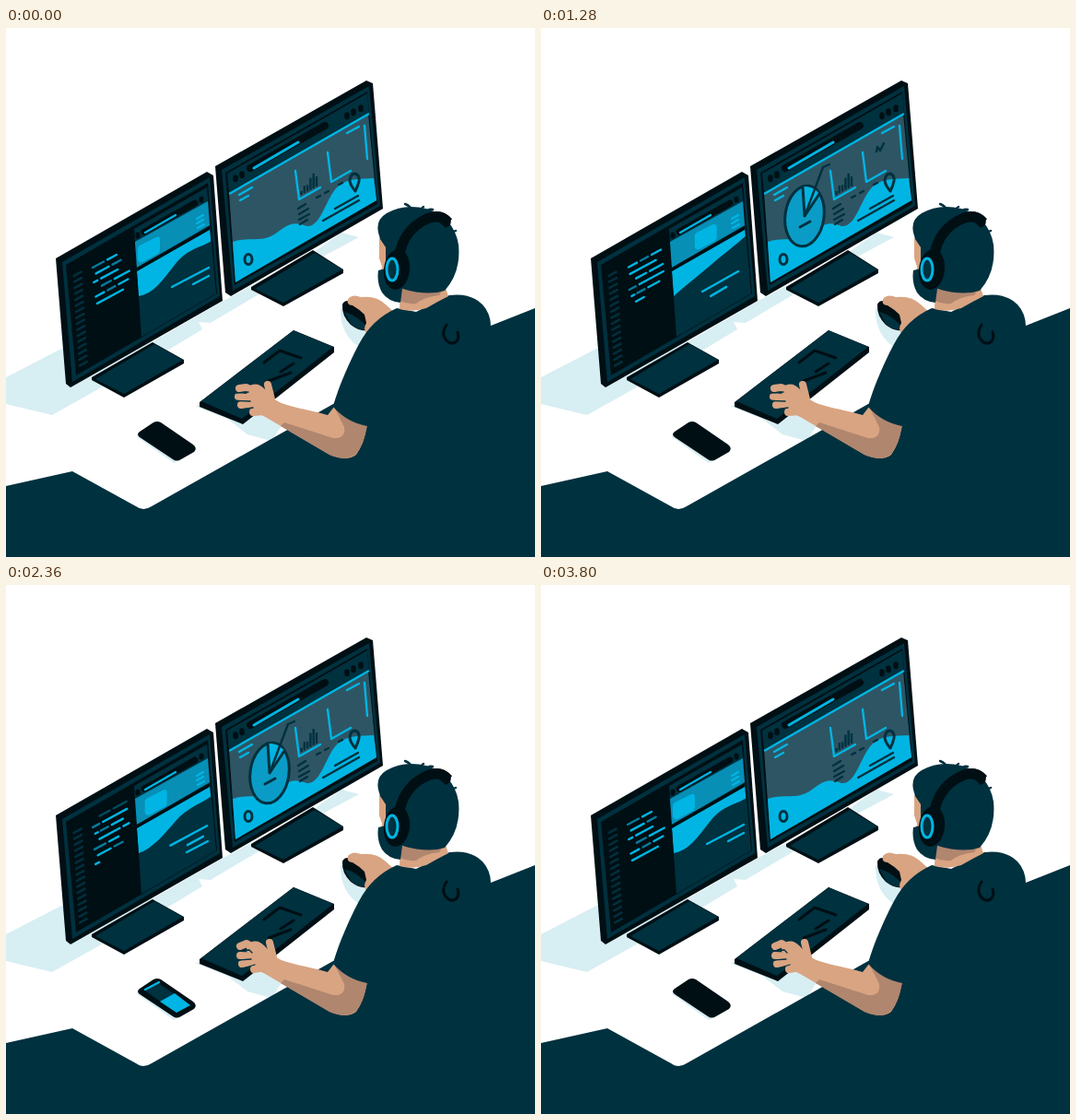
Write an HTML page that moves like this. It is 574 px wide and 574 px high and loops after 3.84 s.

```html
<!DOCTYPE html>
<html lang="en">
<head>
<meta charset="utf-8">
<title>Developer at a desk</title>
<style>
  html, body { margin: 0; height: 100%; overflow: hidden; background: #fff }
  svg { display: block; width: 100vw; height: 100vh }
  .n { fill: #00313f } .k { fill: #000f14 } .c { fill: #00b5e3 }
  .s { fill: #d9a482 } .d { fill: #b0866e } .w { fill: #d7eef3 }
  .l { fill: none; stroke: #00b5e3; stroke-width: 2.4; stroke-linecap: round; stroke-linejoin: round }
  .nl { stroke: #00313f } .kl { stroke: #000f14 } .sl { stroke: #d9a482; stroke-width: 8 }
</style>
</head>
<body>
<svg viewBox="0 0 574 574">
  <clipPath id="site"><path d="M142 264L221 219 229 288 147 335Z"/></clipPath>

  <!-- desk shadows and floor -->
  <path class="w" d="M0 379L60 348 160 340 236 296 330 246 364 222 383 227 340 250 222 320 209 319 213 327 180 347 50 420 0 408Z"/>
  <path class="w" d="M205 410L240 424 262 441 288 448 300 430 270 405ZM141 443L182 472 188 469 160 440Z"/>
  <path class="n" d="M0 497L72 481 141 519Q149 525 158 519L355 408 526 323 574 304V574H0Z"/>

  <!-- left monitor -->
  <path class="k" d="M93 379L159 341 193 360V364L128 401 93 382Z"/>
  <path class="n" d="M97 381L161 343 192 360 128 397Z"/>
  <path class="k" d="M54 250L218 156 225 160 235 296 70 390 65 386Z"/>
  <path class="n" d="M61 254L221 162 232 291 72 384Z"/>
  <path class="k" d="M65 257L219 168 229 288 76 377Z"/>
  <path class="n" d="M139 218L218 173 228 288 147 335Z"/>
  <path class="l kl" style="stroke-width:7" d="M150 221L205 190"/>
  <path class="l kl" style="stroke-width:5" d="M143 224v2M212 185v2"/>
  <path class="l" d="M151 222L184 203"/>
  <path fill="#078fb6" d="M140 232L219 188 221 214 142 260Z"/>
  <path class="l" d="M207 207l7-4M207 212l7-4M208 217l7-4"/>
  <path class="k" d="M142 260L221 215V219L142 264Z"/>
  <path id="gutter" class="l nl"/>
  <g id="left"></g>

  <!-- right monitor -->
  <path class="k" d="M266 281L333 241 366 262V266L301 302 266 284Z"/>
  <path class="n" d="M270 283L335 244 365 262 301 298Z"/>
  <path class="k" d="M227 150L391 57 398 60 409 196 244 291 238 287Z"/>
  <path class="n" d="M234 154L394 63 406 193 246 285Z"/>
  <path class="k" d="M238 157L392 69 403 191 248 279Z"/>
  <path class="n" d="M240 158L392 71 394 93 242 179Z"/>
  <path class="l kl" style="stroke-width:8" d="M265 152L346 106"/>
  <path class="l kl" style="stroke-width:5.5" d="M249 162v2.5M256 158v2.5M370 94v2.5M377 90v2.5M385 86v2.5"/>
  <path class="l" style="stroke-width:3" d="M269 152L317 124"/>
  <path fill="#2e5564" d="M242 179L393 93 402 187 249 276Z"/>
  <path class="c" d="M246 232C264 226 278 233 291 224S310 208 326 215C342 217 347 184 360 172 372 162 385 164 399 163L402 187 249 276Z"/>
  <path class="l" d="M243 179.5L393 93.5M389 106L392 142M370 114L383 107M253 181L267 173M254 187L263 182M314 155L318 186 341 173M349 135L353 167 374 155"/>
  <path class="l nl" d="M317 196l8-5M318 202l10-6M318 208l11-6M319 213l8-5M337 184l4-2M346 179l4-2M361 170l4-2M344 209L383 187M357 196L382 182"/>
  <path class="l nl" style="stroke-width:3" d="M379 177Q373 170 373 165 374 158 379 158 384 160 383 166 382 171 379 177Z"/>
  <ellipse class="l nl" style="stroke-width:3" cx="263" cy="251" rx="4" ry="5.5"/>
  <g id="right"></g>

  <!-- phone -->
  <path class="k" d="M145 438L160 428Q164 426 168 428L203 452Q208 456 204 460L190 468Q185 471 181 468L145 444Q141 441 145 438Z"/>
  <g id="phone">
    <path class="n" d="M149 439L164 431 200 456 185 464Z"/>
    <path class="c" d="M167 452L183 443 200 456 185 464Z"/>
    <path class="l" d="M151 439L166 431"/>
  </g>

  <!-- keyboard -->
  <path class="k" d="M210 406L312 328 356 346V352L257 430 210 411Z"/>
  <path class="n" d="M212 405L312 328 355 346 256 424Z"/>
  <path class="l kl" style="stroke-width:3" d="M280 363L297 350 320 358M298 373L312 364M285 383L309 374"/>

  <!-- mouse and right hand -->
  <path class="w" d="M363 304Q362 334 386 348L400 326 380 312Z"/>
  <g id="mouse">
    <path class="k" d="M365 300Q368 293 377 298L392 311Q398 320 394 327 386 331 374 322 364 312 365 300Z"/>
    <path class="n" d="M367 308Q382 312 393 326 385 330 374 321Z"/>
    <path class="s" d="M371 294Q376 288 385 292 402 290 412 300L424 311 404 335 391 331Q387 327 391 320L389 311Q383 305 376 301 369 301 371 294Z"/>
  </g>

  <!-- typing arm -->
  <path class="s" d="M261 390Q272 382 281 392L290 402C302 411 325 413 349 420L356 411 392 432Q388 452 380 463 370 471 351 463L283 423 262 412Z"/>
  <path class="d" d="M302 428L355 445Q369 446 367 433L356 411 392 432Q388 453 380 462 370 471 351 463L298 432Z"/>
  <path id="fingers" class="l sl"/>
  <path id="gaps" class="l" style="stroke:#00313f;stroke-width:1.3"/>

  <!-- person -->
  <g id="body">
    <path class="n" d="M355 411C361 388 375 358 383 343Q397 316 424 304L445 308 481 290Q504 287 517 300 527 311 526 327L574 350V574H330L385 465 392 432Q370 428 355 411Z"/>
    <path class="l kl" style="stroke-width:3" d="M478 322Q472 331 477 338 483 345 489 340 492 336 490 330"/>
  </g>
  <g id="head">
    <path class="s" d="M428 280L477 282 480 291Q468 297 456 304 440 309 427 305Z"/>
    <path class="d" d="M428 284L474 284 470 290Q453 292 445 299 436 300 427 296Z"/>
    <path class="s" d="M405 228L420 226 420 275 406 268 408 259 405 250Z"/>
    <path class="n" d="M404 222Q401 208 413 201 432 190 456 196 486 205 491 235 494 265 476 285 458 291 430 283L428 298Q415 297 408 287 402 276 404 263L412 261 412 238 406 229Z"/>
    <path class="l nl" d="M433 191Q439 193 441 199M453 194Q449 196 451 201M456 200Q458 196 463 197M480 219Q484 222 488 220"/>
    <path class="l kl" style="stroke-width:11;stroke-linecap:butt" d="M427 246Q431 222 451 210 469 199 480 211"/>
    <path class="k" d="M460 201Q474 196 482 206 485 214 477 217Z"/>
    <ellipse class="k" cx="424" cy="262" rx="14" ry="22" transform="rotate(7 424 262)"/>
    <ellipse class="l" style="fill:#00313f;stroke-width:3" cx="419" cy="262" rx="6" ry="12"/>
  </g>
</svg>
<script>
const LOOP = 3840, HALF = LOOP / 2, ROW_TIME = LOOP / 10;
const get = id => document.getElementById(id);
const ramp = (t, a, b) => {
  const p = Math.max(0, Math.min(1, (t - a) / (b - a)));
  return p * p * (3 - 2 * p);
};
const pulse = (t, a, b, c, d) => ramp(t, a, b) - ramp(t, c, d);
const mix = (a, b, p) => a.map((v, i) => v + (b[i] - v) * p);
const shift = (id, x, y) => get(id).setAttribute('transform', `translate(${x} ${y})`);
const stroke = (d, extra = '') => `<path class="l" d="${d}" ${extra}/>`;

get('gutter').setAttribute('d', Array.from({ length: 16 }, (_, i) =>
  `M${73.5 + i * .42} ${269 + i * 6.5}l8-4.4`).join(''));

// Each code row: pairs of start and length along the row.
const rows = [
  [8, 11, 23, 14], [0, 7, 11, 26], [2, 3, 8, 8, 20, 12], [6, 22, 32, 6], [0, 12, 16, 10],
  [3, 14, 21, 9], [0, 4, 8, 18], [8, 10, 22, 16], [1, 9, 14, 8, 26, 10], [2, 28]
];

function drawCode(t) {
  const pos = t / ROW_TIME, k = Math.floor(pos), part = pos - k;
  const scroll = ramp(part, 0, .25);
  let out = '';
  for (let i = 0; i < 7; i++) {
    const row = (k + i + 4) % 10, slot = i - scroll;
    const typed = i == 6 ? part * 44 : 44;
    for (let j = 0; j < rows[row].length; j += 2) {
      const start = rows[row][j], len = Math.min(rows[row][j + 1], typed - start);
      if (len <= 0) continue;
      const x = 94 + slot * .6 + start, y = 260 + slot * 8 - start * .54;
      const color = (row + j) % 3 == 1 ? '#087a9c' : '#00b5e3';
      out += stroke(`M${x} ${y}l${len} ${-len * .54}`,
        `style="stroke:${color}" opacity="${i ? 1 : 1 - scroll}"`);
    }
  }
  return out;
}

function drawSite(t, h) {
  const p = pulse(h, 320, 640, 1270, 1470);
  const w = mix([160, 288, 172, 272, 183, 257, 197, 239, 208, 240, 223, 231],
                [157, 279, 169, 270, 182, 259, 195, 248, 208, 238, 223, 225], p);
  const a = mix([180, 281, 220, 260], [175, 286, 214, 264], p);
  const b = mix([203, 278, 220, 269], [184, 291, 201, 281], p);
  const extra = pulse(t, 1500, 1800, 3000, 3300);
  return `<g clip-path="url(#site)"><path class="c" d="M142 264L222 218V${w[11]}L${w.slice(10)}
      C${w.slice(8, 10)} ${w.slice(6, 8)} ${w.slice(4, 6)}S${w.slice(0, 2)} 144 291Z"/></g>
    <path fill="#00b5e3" d="M${145 + 24 * p} ${236 - 14 * p}l18-9q4-1 4 3v11q0 3-4 5l-15 8q-5 1-5-4v-10q0-3 2-4Z"/>`
    + stroke(`M${a.slice(0, 2)}L${a.slice(2)}M${b.slice(0, 2)}L${b.slice(2)}`)
    + (extra > .01 ? stroke(`M219 278l${-23 * extra} ${12 * extra}`) : '');
}

function drawCharts(t, h) {
  const size = pulse(t, 240, 640, 3240, 3560);
  const legend = pulse(t, 600, 840, 3120, 3300);
  let out = '';
  if (size > .01) out += `<g transform="translate(286 204) scale(${size})">
    <ellipse class="l nl" style="stroke-width:3;fill:#0a9cc6" rx="21" ry="33" transform="rotate(8)"/>
    <path class="c" d="M0 0L-2-32Q9-33 16-24Z"/>
    <path class="l nl" style="stroke-width:3" d="M-2-32L0 0 16-24M-5 12l11-6"/></g>`;
  if (legend > .01) out += stroke(`M286 204L${286 + 20 * legend} ${204 - 53 * legend}`
    + (t > 900 && legend > .9 ? 'L313 148' : ''), 'style="stroke:#00313f"');

  const grow = .5 + .5 * Math.sin(t / LOOP * Math.PI * 6 - Math.PI / 2);
  for (let i = 0; i < 6; i++) {
    const height = 4 + [0, 4, 3, 9, 12, 7][i] + grow * [1, 4, 3, 9, 8, 4][i];
    out += stroke(`M${320.5 + i * 3.3} ${181 - i * 1.8}v${-height}`,
      'style="stroke:#00313f;stroke-linecap:butt"');
  }

  // The check mark is drawn, then runs out at its far end.
  const head = ramp(h, 420, 1160) * 100, tail = ramp(h, 880, 1560) * 100;
  if (head - tail > .5) out += stroke('M356 148L360 157 365 129 368 133 372 125',
    `pathLength="100" stroke-dasharray="${head - tail} 200" stroke-dashoffset="${-tail}" style="stroke:#00313f"`);
  return out;
}

function frame(now) {
  const t = now % LOOP, h = t % HALF;
  get('left').innerHTML = drawCode(t) + drawSite(t, h);
  get('right').innerHTML = drawCharts(t, h);
  get('phone').setAttribute('opacity', pulse(t, 1680, 1800, 3560, 3680));

  const sway = pulse(t, 560, 800, 960, 1200) + pulse(t, 1640, 1840, 2000, 2240);
  shift('body', -sway, 0);
  shift('head', -sway, 0);
  const slide = pulse(t, 600, 840, 960, 1200);
  shift('mouse', 3 * slide, 2 * slide);

  const down = t % 240 < 100;
  get('fingers').setAttribute('d', down
    ? 'M288 403L284 387M276 397L261 390 253 391M272 402L252 400M274 408L255 409M281 416L268 417M275 400L278 412'
    : 'M290 404L286 388M276 398L261 389 254 392M272 403L254 402M274 408L256 411M281 415L269 417M275 400L280 411');
  get('gaps').setAttribute('d', down
    ? 'M250 396L263 395M250 404.5L265 405M258 413.5L268 412'
    : 'M251 397L264 396 267 399M253 407L266 406M260 415L270 412');
  requestAnimationFrame(frame);
}
requestAnimationFrame(frame);
</script>
</body>
</html>
```
